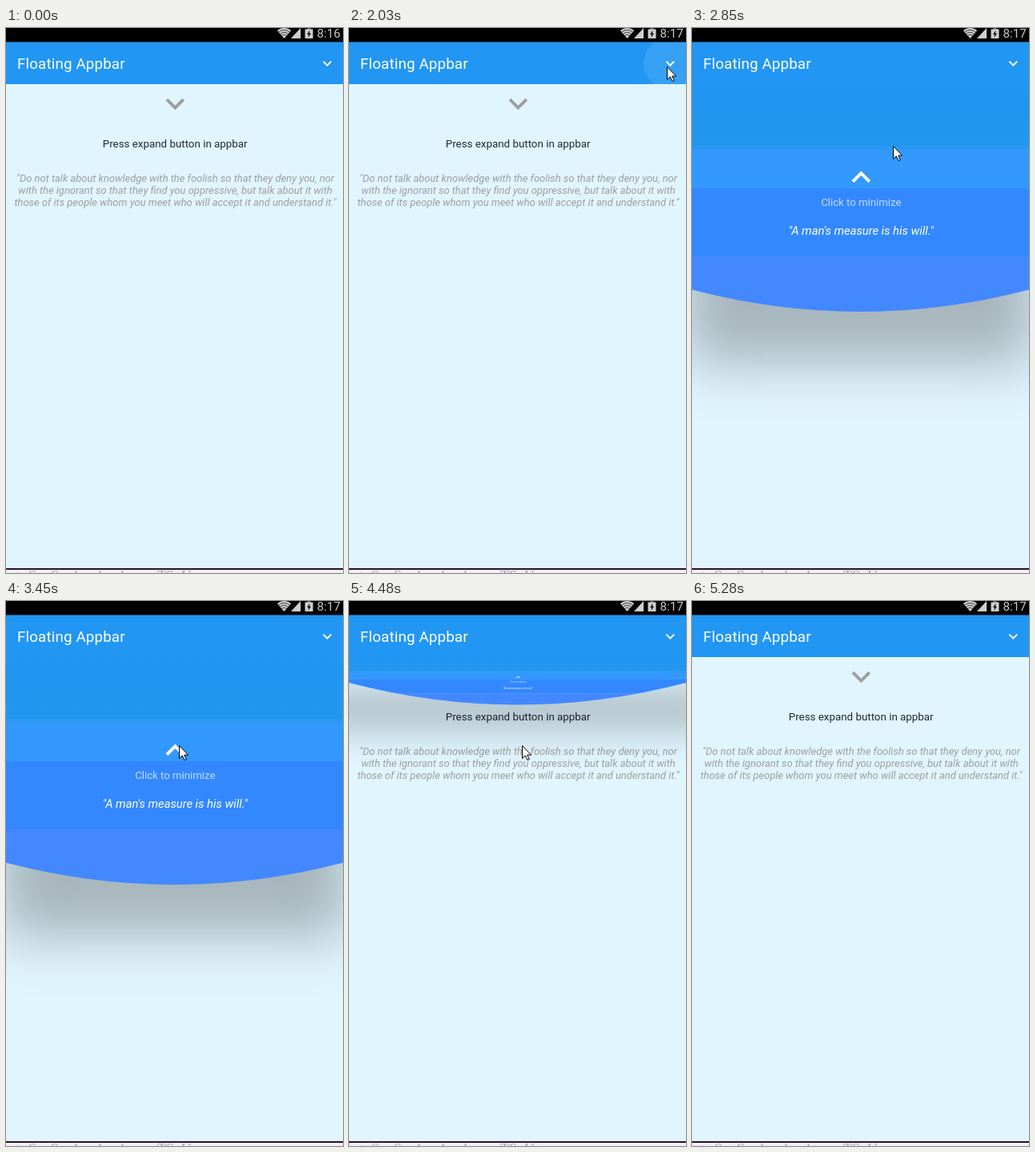
Write an HTML page with a canvas that moves like this. It is 421 px wide and 680 px high and loops after 6.31 s.

```html
<!DOCTYPE html>
<html lang="en">
<head>
<meta charset="utf-8">
<title>Floating Appbar</title>
<style>
  html, body { margin: 0; width: 100%; height: 100%; overflow: hidden; background: #e1f5fe; }
  canvas { display: block; width: 421px; height: 680px; }
</style>
</head>
<body>
<canvas id="stage" width="421" height="680"></canvas>
<script>
const ctx = document.getElementById('stage').getContext('2d');
const W = 421, H = 680, LOOP = 6310, MID = 211.3, BAR = 70, PIVOT = 71.5;
const FONT = 'Roboto, sans-serif';

// [start time, value]: each value holds until the next one
const cursorSteps = [
  [0, null], [200, [216, 137]], [400, null],
  [800, [398, 37]], [1000, [398, 44]], [1230, [397, 46]], [2030, [397, 48]],
  [2240, [320, 129]], [2450, [255, 210]], [2650, [234, 198]], [2850, [251, 147]],
  [3050, [238, 163]], [3250, [219, 175]], [3450, [216, 180]],
  [4880, [85, 293]], [5080, [30, 311]], [5280, null]
];
const openSteps = [[0, 0], [2240, 1], [4270, 0.973], [4480, 0.205], [4680, 0]];

const at = (steps, t) => steps.filter(s => s[0] <= t).pop()[1];

const chevron = new Path2D('M4.59-3.41L0 1.17-4.59-3.41-6-2 0 4 6-2z');
const arrow = new Path2D('M0 0V16L3.7 12.4 6.5 18 8.8 17 6.2 11.6H11z');

function rect(color, x, y, w, h) {
  ctx.fillStyle = color;
  ctx.fillRect(x, y, w, h);
}

function text(str, x, y, font, color, align = 'center') {
  ctx.font = font;
  ctx.fillStyle = color;
  ctx.textAlign = align;
  ctx.fillText(str, x, y);
}

function fillAt(path, x, y, color, sx, sy = sx) {
  ctx.save();
  ctx.translate(x, y);
  ctx.scale(sx, sy);
  ctx.fillStyle = color;
  ctx.fill(path);
  ctx.restore();
}

function poly(color, ...pts) {
  ctx.beginPath();
  pts.forEach(p => ctx.lineTo(...p));
  ctx.fillStyle = color;
  ctx.fill();
}

function statusBar(t) {
  const grey = '#cfcfcf';
  rect('#000', 0, 0, W, 17.5);
  // wifi
  ctx.beginPath();
  ctx.moveTo(347.5, 13);
  ctx.arc(347.5, 13, 13, -Math.PI * 0.73, -Math.PI * 0.27);
  ctx.fillStyle = grey;
  ctx.fill();
  ctx.strokeStyle = '#333';
  ctx.lineWidth = 1;
  for (const r of [4.5, 7.5, 10.5]) {
    ctx.beginPath();
    ctx.arc(347.5, 13, r, -Math.PI * 0.75, -Math.PI * 0.25);
    ctx.stroke();
  }
  // signal and battery
  poly(grey, [368, 0], [368, 13], [356, 13]);
  rect(grey, 373.5, 1.5, 10, 11.5);
  rect(grey, 376.5, 0.5, 4, 1);
  poly('#000', [379.5, 3], [376, 8], [378, 8], [377.5, 12], [381, 6.8], [379, 6.8]);
  text(t < 600 ? '8:16' : '8:17', 388.5, 12, '15.2px ' + FONT, '#c8c8c8', 'left');
}

function page() {
  rect('#e1f5fe', 0, 0, W, H);
  fillAt(chevron, MID, 94.4, '#9e9e9e', 1.96);
  text('Press expand button in appbar', 211.2, 149, '13.35px ' + FONT, '#1f2930');
  [
    '"Do not talk about knowledge with the foolish so that they deny you, nor',
    'with the ignorant so that they find you oppressive, but talk about it with',
    'those of its people whom you meet who will accept it and understand it."'
  ].forEach((line, i) => text(line, 211.5, 192 + 15 * i, 'italic 12.93px ' + FONT, '#9e9e9e'));
}

// casts only the shadow: the box itself lies off stage
function shadow(bottom, open) {
  const spread = 40 - 32 * open;
  ctx.save();
  ctx.shadowColor = `rgba(0,0,0,${0.18 + 0.08 * open})`;
  ctx.shadowBlur = 34 + 30 * open;
  ctx.shadowOffsetX = 1000;
  ctx.shadowOffsetY = 28 + 37 * open;
  rect('#000', -1000 - spread, BAR, W + 2 * spread, bottom - BAR);
  ctx.restore();
}

function panel(open) {
  const bottom = PIVOT + 282.5 * open, edge = bottom - 27.5;
  shadow(bottom, open);

  ctx.save();
  ctx.beginPath();
  ctx.moveTo(0, BAR);
  ctx.lineTo(0, edge);
  ctx.quadraticCurveTo(W / 2, bottom + 27.5, W, edge);
  ctx.lineTo(W, BAR);
  ctx.clip();
  ctx.translate(MID, PIVOT);
  ctx.scale(open, open);
  const band = (color, y, h) => rect(color, -1200, y, 2400, h);
  const sky = ctx.createLinearGradient(0, 0, 0, 80);
  sky.addColorStop(0, '#2196f2');
  sky.addColorStop(0.94, '#2197ed');
  sky.addColorStop(0.95, '#2a98f1');
  band(sky, -20, 101);
  band('#3399ff', 80, 50);
  band('#3388ff', 128.5, 86);
  band('#4488ff', 213.5, 100);
  fillAt(chevron, 0, 114.9, '#fff', 1.96, -1.96);
  text('Click to minimize', 0, 150.5, '13.2px ' + FONT, 'rgba(255,255,255,.7)');
  text('"A man\'s measure is his will."', -0.2, 186.5, 'italic 14.75px ' + FONT, '#fff');
  ctx.restore();
}

function appBar(t) {
  rect('#2196f3', 0, 17, W, BAR - 17);
  if (t >= 1840 && t < 2240) {
    ctx.save();
    ctx.beginPath();
    ctx.rect(0, 18, W, BAR - 18);
    ctx.clip();
    ctx.beginPath();
    ctx.arc(401, 44, 33, 0, Math.PI * 2);
    ctx.fillStyle = 'rgba(255,255,255,.09)';
    ctx.fill();
    ctx.restore();
  }
  ctx.letterSpacing = '0.14px';
  text('Floating Appbar', 14, 51, '18.8px ' + FONT, '#fff', 'left');
  ctx.letterSpacing = '0px';
  fillAt(chevron, 401.3, 44.2, '#fff', 0.94);
}

// sliver of the document below the phone screen
function footer() {
  rect('#f4eff5', 0, 674, W, 6);
  rect('#2c1030', 0, 674, W, 2);
  const marks = { 12: 't', 28: 'S', 56: 'S', 85: 'l', 115: 'l', 143: 'l', 189: 'TS', 219: 'U' };
  for (const x in marks) text(marks[x], +x, 689.5, '18px "Liberation Serif", serif', '#a8a4aa', 'left');
}

function cursor(pos) {
  if (!pos) return;
  ctx.save();
  ctx.translate(pos[0] + 0.5, pos[1] + 0.5);
  ctx.fillStyle = '#fff';
  ctx.strokeStyle = '#000';
  ctx.lineWidth = 1;
  ctx.fill(arrow);
  ctx.stroke(arrow);
  ctx.restore();
}

const start = performance.now();

function draw(now) {
  const t = Math.max(0, now - start) % LOOP, open = at(openSteps, t);
  page();
  if (open) panel(open);
  appBar(t);
  statusBar(t);
  footer();
  cursor(at(cursorSteps, t));
  requestAnimationFrame(draw);
}

draw(start);
</script>
</body>
</html>
```
